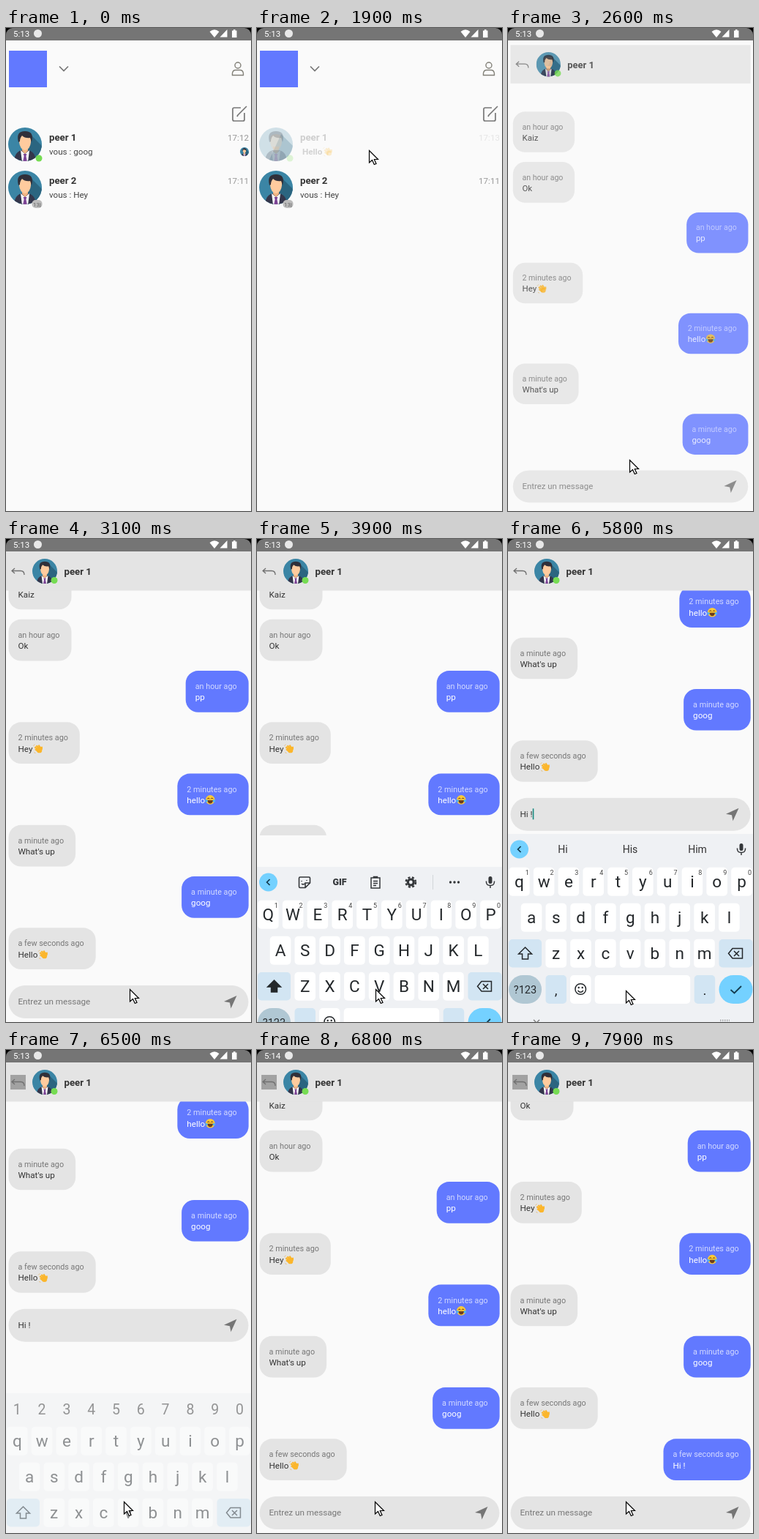
Recreate the animation shown at these times as an HTML page with a canvas. Size 335x660 px, loop 8 s.

```html
<!DOCTYPE html>
<html lang="fr">
<head>
<meta charset="utf-8">
<title>Chat</title>
<style>
html, body { margin: 0; width: 100%; height: 100%; overflow: hidden; background: #fafafa; }
canvas { display: block; width: 335px; height: 660px; }
</style>
</head>
<body>
<canvas id="stage"></canvas>
<script>
const W = 335, H = 660, LOOP = 8000;
const PAGE = '#fafafa', GREY = '#e4e4e4', BLUE = '#6279ff', INK = '#333', ICON = '#777';
const ROW = 70.25, KEYBOARD_SHIFT = -256.2;
const canvas = document.getElementById('stage');
const c = canvas.getContext('2d');
const ratio = window.devicePixelRatio || 1;
canvas.width = W * ratio;
canvas.height = H * ratio;

const messages = [
  [0, 'an hour ago', 'Kaiz'],
  [0, 'an hour ago', 'Ok'],
  [1, 'an hour ago', 'pp'],
  [0, '2 minutes ago', 'Hey', 'wave'],
  [1, '2 minutes ago', 'hello', 'laugh'],
  [0, 'a minute ago', "What's up"],
  [1, 'a minute ago', 'goog'],
  [0, 'a few seconds ago', 'Hello', 'wave'],
  [1, 'a few seconds ago', 'Hi !']
];

// Stepped timelines: [start ms, value]
const pointer = [[0, null], [1100, [181, 0]], [1200, [150, 60]], [1300, [112, 140]], [1400, [94, 192]],
  [1500, [130, 180]], [1600, [153, 167]], [2100, [153, 195]], [2200, [155, 300]], [2300, [158, 430]],
  [2400, [162, 538]], [2600, [166, 590]], [2700, [168, 612]], [3100, [169, 615]], [3200, [166, 617]],
  [3300, [162, 615]], [4500, [161, 617]]];
const rowAlpha = [[0, 1], [1900, .22], [2100, .35], [2200, .7], [2300, 1]];
const scroll = [[0, ROW], [3100, 0], [4000, KEYBOARD_SHIFT], [6700, 0], [7900, -ROW]];
const typed = [[0, ''], [4700, 'H'], [5000, 'Hi'], [5700, 'Hi '], [5800, 'Hi !'], [6700, '']];
const caret = [[0, 0], [3700, 1], [4200, 0], [4700, 1], [5300, 0], [5700, 1], [6300, 0]];
const keyboard = [[0, null], [3900, [45, 1]], [4000, [0, 1]], [6300, [12, .9]], [6400, [36, .75]],
  [6500, [66, .5]], [6700, null]];
const strip = [[0, 'tools'], [5000, 'words'], [6000, 'tools'], [6300, 'digits']];

const at = (track, t) => track.filter(step => step[0] <= t).pop()[1];

function ink(d, fill, stroke, width = 1.5) {
  const p = new Path2D(d);
  if (fill) { c.fillStyle = fill; c.fill(p); }
  if (stroke) { c.strokeStyle = stroke; c.lineWidth = width; c.stroke(p); }
}
function box(x, y, w, h, r, fill) {
  c.beginPath();
  c.roundRect(x, y, w, h, r);
  c.fillStyle = fill;
  c.fill();
}
const disc = (x, y, r, fill) => box(x - r, y - r, 2 * r, 2 * r, r, fill);
function text(s, x, y, size, color, align = 'left', weight = 400) {
  c.font = `${weight} ${size}px Roboto, sans-serif`;
  c.textAlign = align;
  c.fillStyle = color;
  c.fillText(s, x, y);
  return c.measureText(s).width;
}
function group(x, y, scale, alpha, draw) {
  c.save();
  c.translate(x, y);
  c.scale(scale, scale);
  c.globalAlpha *= alpha;
  draw();
  c.restore();
}
const zoomed = (scale, alpha, draw) => group(W / 2 * (1 - scale), H / 2 * (1 - scale), scale, alpha, draw);
function clipped(x, y, w, h, draw) {
  c.save();
  c.beginPath();
  c.rect(x, y, w, h);
  c.clip();
  draw();
  c.restore();
}

function avatar(x, y, r) {
  group(x, y, r / 23, 1, () => {
    c.beginPath();
    c.arc(0, 0, 23, 0, 7);
    c.clip();
    ink('M-23-23H23V23H-23Z', '#3b85a5');
    ink('M7-14L30 9V23H-10Z', '#2b6580');
    ink('M-15 24Q-15 11-5 8H5Q15 11 15 24Z', '#34364b');
    ink('M-6 8L0 13L6 8L4 24H-4Z', '#fff');
    ink('M-2.4 13H2.4L1.4 16L3 24H-3L-1.4 16Z', '#7c4495');
    ink('M-4 3H4V9L0 13L-4 9Z', '#f0b483');
    ink('M-8-8Q-8-14 0-14Q8-14 8-8V-3Q7 7 0 8Q-7 7-8-3Z', '#ffcb9e');
    ink('M-9-3Q-13-18 0-18Q13-18 9-3L7-9Q0-8-4-12Q-7-9-7-4Z', '#30303a');
  });
}

function emoji(kind, x, y) {
  group(x, y - 11, 1, 1, () => {
    if (kind === 'wave') {
      ink('M3 4.5L8 9M5 2.5L10 8M8 2L12 8M3.5 7.5L8 11M12.4 4V8', null, '#fbb62c', 2.3);
      disc(9.3, 9, 3.6, '#fbb62c');
      ink('M1 3L3 1M2 12L4 13', null, '#e6b25b', .8);
    } else {
      disc(7, 6.5, 6.3, '#fcc936');
      ink('M3 7H11Q10 11.5 7 11.5Q4 11.5 3 7Z', '#6b3d20');
      ink('M3 5L5 4L6 5.5M8 5.5L9 4L11 5', null, '#6b3d20', 1);
      disc(1.8, 8, 1.8, '#50b4f2');
      disc(12.2, 8, 1.8, '#50b4f2');
    }
  });
}

function statusBar(t) {
  box(0, 0, W, 17, 0, '#000');
  box(0, 0, W, 17, [9, 9, 0, 0], '#757575');
  text(t < 6700 ? '5:13' : '5:14', 10, 12, 11.5, '#fff');
  disc(43.5, 7.5, 5.5, '#e8e8e8');
  ink('M278.5 5Q285-.5 291.5 5L285 13ZM302.5 2V12.5H292.5ZM309 3.5H311V2H313.5V3.5H315.5V13H309Z', '#fff');
}

function contact(y, name, last, time, unread) {
  avatar(26, y, 23);
  text(name, 59, y - 5.5, 13.2, INK, 'left', 700);
  const x = unread ? 62 : 59;
  const w = text(last, x, y + 14, 11.65, '#444', 'left', unread ? 700 : 400);
  if (unread) emoji('wave', x + w, y + 14);
  text(time, 332, y - 5.5, 11.65, '#999', 'right');
}

function home(t) {
  box(4, 31, 52, 50, 0, BLUE);
  ink('M73 52.5L79 58.5L85 52.5', null, ICON, 1.7);
  ink('M321 51A4 4 0 1 1 313 51A4 4 0 1 1 321 51ZM309.5 64.5V62Q310 57.5 314 57.5H320Q324 57.5 324.5 62V64.5Z',
    null, '#828078', 1.4);
  ink('M321 109H312Q310 109 310 111V125Q310 127 312 127H324Q326 127 326 125V116M317 119L329 107M317 119L316 121',
    null, ICON, 1.7);
  const fresh = t >= 900;
  group(0, 0, 1, at(rowAlpha, t), () => {
    contact(159, 'peer 1', fresh ? 'Hello' : 'vous : goog', fresh ? '17:13' : '17:12', fresh);
    disc(45, 178, 4.5, '#76dc53');
    if (!fresh) avatar(326, 169, 6);
  });
  contact(218, 'peer 2', 'vous : Hey', '17:11');
  box(35.5, 235, 14, 11, 5, '#bcbcbc');
  text('13j', 42.5, 243.5, 8, '#666', 'center');
}

function bubble([mine, when, body, face], y) {
  c.font = '400 10.8px Roboto, sans-serif';
  const w = c.measureText(when).width + 29;
  const x = mine ? 331.7 - w : 3.5;
  box(x, y, w, 56.7, 17, mine ? BLUE : GREY);
  text(when, x + 13, y + 25, 10.8, mine ? '#d3d9ff' : '#777');
  const end = x + 13 + text(body, x + 13, y + 40.3, 11.65, mine ? '#fff' : INK);
  if (face) emoji(face, end, y + 40.3);
}

function chat(t) {
  const shift = at(scroll, t);
  const raised = t >= 4000 && t < 6700;
  const bottom = raised ? 345 : t >= 3900 && t < 4000 ? 405 : 601;
  const count = t < 6700 ? 8 : 9;
  clipped(0, 70, W, bottom - 70, () =>
    messages.slice(0, count).forEach((m, i) => bubble(m, 39.6 + i * ROW + shift)));

  box(0, 17, W, 53.5, 0, GREY);
  if (t >= 6300) box(6, 34, 21, 20, 0, '#a2a2a2');
  ink('M12 40L8 43.5L12 47M8 43.5H20Q25 43.5 25 49', null, '#707070', 1.3);
  avatar(53, 44, 17);
  disc(66, 56.5, 4.5, '#76dc53');
  text('peer 1', 79.5, 49, 13.2, INK, 'left', 700);

  group(0, raised ? KEYBOARD_SHIFT : 0, 1, 1, () => {
    box(3.5, 610, 328, 45, 22.5, GREY);
    const value = at(typed, t);
    const w = text(value || 'Entrez un message', 16.5, 636, 11.65, value ? INK : ICON);
    if (at(caret, t)) box(16.7 + (value ? w : 0), 624.5, 1.6, 15, 0, '#168a80');
    ink('M315.5 624L298 632L306 633.5L307.5 641.5Z', '#757575');
  });
}

function tools() {
  const dark = '#34373a';
  ink('M59 417H71Q72.500 417 72.500 418.500V425L66 431.500H59Q57.500 431.500 57.500 430V418.500Q57.500 417 59 417ZM66 431V425H72M61 422V423M68 421V422M61 426Q63 428 65 426',
    null, dark, 1.6);
  text('GIF', 113, 428.3, 12.5, dark, 'center', 900);
  ink('M156 418H168V432H156ZM159.500 418V416.500H164.500V418M159 422.500H165M159 425.500H165M159 428.500H163', null, dark, 1.5);
  disc(210.3, 424, 5.6, dark);
  c.setLineDash([3, 2.5]);
  ink('M217 424A6.7 6.7 0 1 1 203.6 424A6.7 6.7 0 1 1 217 424', null, dark, 2.4);
  c.setLineDash([]);
  disc(210.3, 424, 2.4, '#eff1f4');
  box(240, 414, 1, 20, 0, '#d2d5d8');
  [264.500, 270, 275.500].forEach(x => disc(x, 424, 1.7, dark));
}

function toolStrip(mode) {
  if (mode === 'digits') {
    [...'1234567890'].forEach((d, i) => text(d, 15.3 + 33.8 * i, 432, 19.5, INK, 'center'));
    return;
  }
  disc(15.5, 424, 12.5, '#74d1ff');
  ink('M17.5 420L13.5 424L17.5 428', null, '#14394c', 1.7);
  if (mode === 'tools') tools();
  else ['Hi', 'His', 'Him'].forEach((s, i) => text(s, 75 + 92 * i, 429, 14, INK, 'center'));
  box(316.5, 416, 5, 10, 2.5, '#34373a');
  ink('M313.5 422.500V424Q314 428.500 319 428.500Q324 428.500 324.500 424V422.500M319 428.500V432', null, '#34373a', 1.5);
}

function keys(t) {
  const upper = t < 4800, mode = at(strip, t), pale = '#d2e5f3', dark = '#24282b';
  box(0, 403, W, 270, 0, '#eff1f4');
  toolStrip(mode);
  ['qwertyuiop', 'asdfghjkl', 'zxcvbnm'].forEach((letters, row) => {
    const y = 448.7 + 49 * row;
    [...letters].forEach((letter, i) => {
      const x = [15.3, 32, 65.700][row] + 33.8 * i;
      box(x - 14.3, y, 28.6, 39, 5, '#fff');
      text(upper ? letter.toUpperCase() : letter, x, y + 27, 22.5, dark, 'center');
      if (!row && mode !== 'digits') text((i + 1) % 10, x + 11, y + 10.5, 9, '#444', 'center');
    });
  });
  box(1, 547, 45, 38.5, 5, pale);
  ink('M23.5 558L32.500 567H27.500V574H19.500V567H14.500Z', upper ? dark : null, dark, 1.5);
  box(288.5, 547, 46, 38.5, 5, pale);
  ink('M307 559.500H320.500V573H307L301.500 566.300ZM309 563L316 570M316 563L309 570', null, dark, 1.5);

  box(1, 596, 45, 39, 19.5, '#b0c7d3');
  text('?123', 23.5, 621, 14.5, dark, 'center');
  box(51.5, 596, 28.5, 39, 5, pale);
  text(',', 65.700, 623, 19, dark, 'center');
  box(85, 596, 28.5, 39, 5, '#fff');
  ink('M106.500 615A7.300 7.300 0 1 1 91.900 615A7.300 7.300 0 1 1 106.500 615M95.500 617Q99.200 621.500 103 617', null, dark, 1.5);
  disc(96.700, 613, 1.2, dark);
  disc(101.700, 613, 1.2, dark);
  box(118.700, 596, 130.500, 39, 5, '#fff');
  box(254.700, 596, 28.500, 39, 5, pale);
  text('.', 269, 623, 19, dark, 'center');
  box(288.5, 596, 46, 39, 19.5, '#74d1ff');
  ink('M304.500 616L309.500 620.500L319 611', null, '#143c50', 1.8);
  ink('M35 657L39 661L43 657', null, ICON, 1.3);
  c.setLineDash([1.5, 1.5]);
  ink('M290 657.500H303M290 660H303', null, ICON, 1.2);
  c.setLineDash([]);
}

function drawPointer([x, y]) {
  group(x + .5, y + .5, 1, 1, () =>
    ink('M0 0V16.500L4 13L6.800 19L9.500 18L6.800 12H12Z', '#fff', '#000', 1.2));
}

function render(t) {
  c.setTransform(ratio, 0, 0, ratio, 0, 0);
  c.globalAlpha = 1;
  box(0, 0, W, H, 0, PAGE);
  clipped(0, 17, W, H - 17, () => {
    if (t < 2400) home(t);
    else if (t < 2600) zoomed(1.05, .6, () => home(t));
    else if (t < 2700) zoomed(.98, .8, () => chat(t));
    else chat(t);
    const panel = at(keyboard, t);
    if (panel) group(0, panel[0], 1, panel[1], () => keys(t));
  });
  statusBar(t);
  const spot = at(pointer, t);
  if (spot) drawPointer(spot);
}

const start = performance.now();
function frame() {
  render((performance.now() - start) % LOOP);
  requestAnimationFrame(frame);
}
frame();
</script>
</body>
</html>
```
